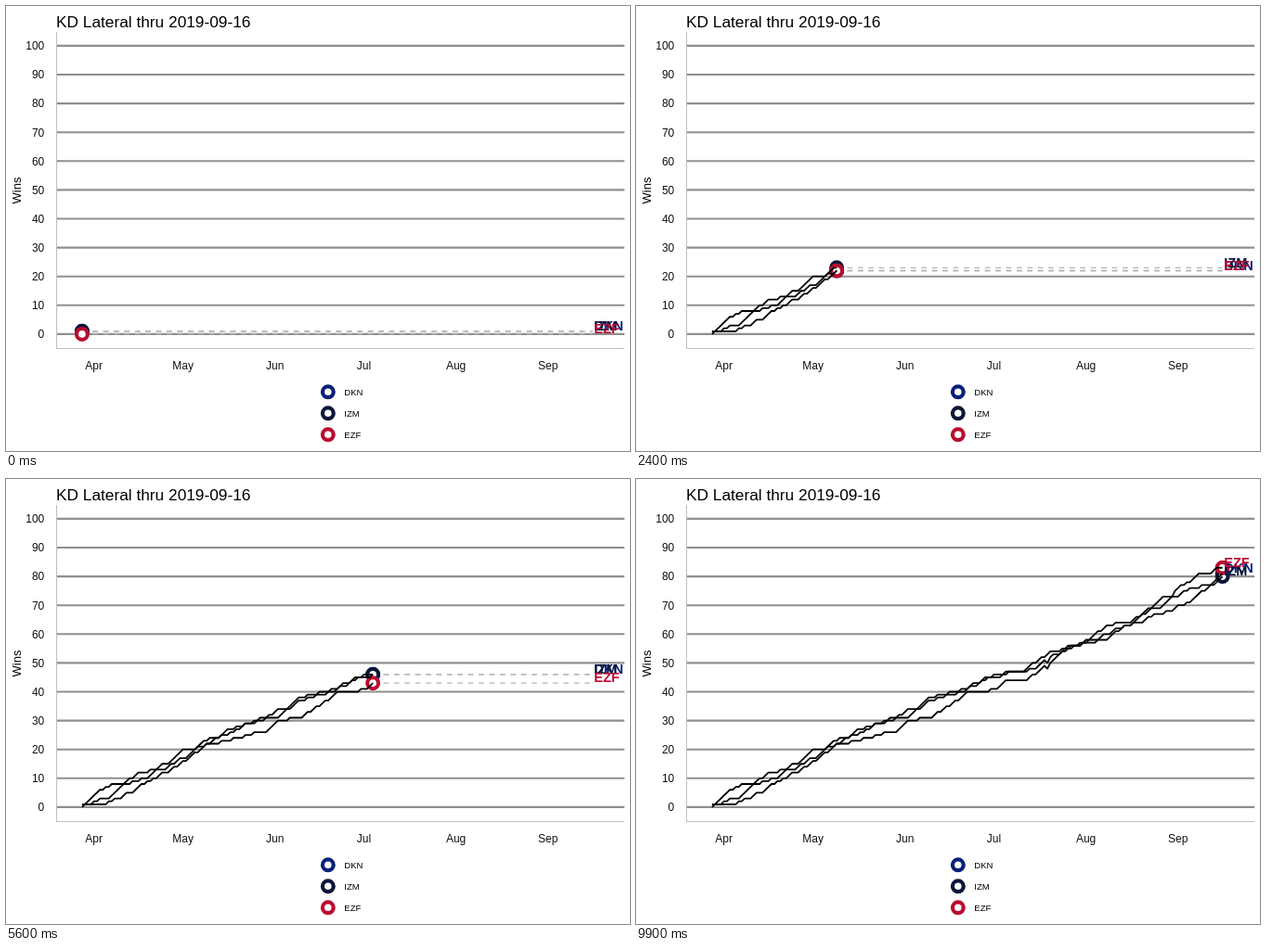
An HTML page for the animation above (10000 ms loop, 672 by 480 pixels).

```html
<!DOCTYPE html>
<html lang="en">
<head>
<meta charset="utf-8">
<title>Wins by day</title>
<style>
  html, body { margin: 0; width: 100%; height: 100%; overflow: hidden; background: #fff; }
  svg { display: block; width: 672px; height: 480px; }
  text { font-family: "Liberation Sans", Arial, sans-serif; font-size: 12px; fill: #111; }
  .title { font-size: 17.3px; fill: #000; }
  .axis-title { font-size: 13px; fill: #000; }
  .legend { font-size: 9.5px; fill: #000; }
  .label { font-size: 14.5px; font-weight: bold; }
  .grid { stroke: #8f8f8f; stroke-width: 2.1; }
  .axis { stroke: #bdbdbd; stroke-width: 1; }
  .lead { stroke: #b4b4b4; stroke-width: 1.4; stroke-dasharray: 5.7 5.7; }
  .ring { fill: #fff; stroke-width: 4.2; }
  .run { fill: none; stroke: #000; stroke-width: 1.8; stroke-linejoin: round; }
</style>
</head>
<body>
<svg id="chart" viewBox="0 0 672 480"></svg>
<script>
  const LAST_DAY = 172, FRAMES = 100, FRAME_MS = 100;

  // One character per day, in groups by month: W one win, D two wins, L one taken back.
  const teams = [
    { name: 'DKN', color: '#081f7a', start: 1, log: [
      '---',
      '-----W-W--WW--WWW-W-W-WW--WW-W',
      'W-WWW-WWW-WW-W--W-W-WW--W---W--',
      '--WWW-WWW--W--W---WW--WW--W-W-',
      '---W-W-----WWW-WW-WW---W---W--W',
      '-WWWW-WW--W-----WW-WWW----WWWW-',
      '-WW-W---W---WWWW'] },
    { name: 'IZM', color: '#0a1638', start: 1, log: [
      '-WW',
      'WWW-W-W----WW-WW---W-----WW-WW',
      '--WWWWWW-W---WWW--W--W---WW--W-',
      'WW---WWWW--W---W-----WW--WWW--',
      'W---W-------W--WWWLDW--W-WW---W',
      '----WWW--WW--W--W---WW-W---W--W',
      'W--W-WWWW-WW-WWW'] },
    { name: 'EZF', color: '#ba0c2f', start: 0, log: [
      'W--',
      'W-W---WWWWW--W--W--WWWWW--WWWW',
      'W----W--W----W---W---W--W----WW',
      'WW---W----WW-WW-WW-WWW-------W',
      '--WWW-------WW-WWWLDWWWWWW---W-',
      'W-------WWW-WW--WWWW-WWWWWW---D',
      'WW-W-WWW----WW--'] }
  ];
  const STEP = { W: 1, D: 2, L: -1, '-': 0 };

  const chart = document.getElementById('chart');
  const dayX = d => 81.9 + d * 3.196;
  const winY = w => 353.9 - w * 3.11;

  function add(tag, attrs, text) {
    const el = document.createElementNS('http://www.w3.org/2000/svg', tag);
    set(el, attrs);
    if (text !== undefined) el.textContent = text;
    return chart.appendChild(el);
  }
  function set(el, attrs) {
    for (const key in attrs) el.setAttribute(key, attrs[key]);
  }
  const line = (cls, x1, y1, x2, y2) => add('line', { class: cls, x1, y1, x2, y2 });
  const ring = (color, cx, cy) => add('circle', { class: 'ring', stroke: color, cx, cy, r: 5.9 });

  for (let w = 0; w <= 100; w += 10) {
    line('grid', 54, winY(w), 666, winY(w));
    add('text', { x: 41.3, y: winY(w) + 4.3, 'text-anchor': 'end' }, w);
  }
  line('axis', 54.5, 28, 54.5, 370);
  line('axis', 54, 369.5, 666, 369.5);

  [['Apr', 4], ['May', 34], ['Jun', 65], ['Jul', 95], ['Aug', 126], ['Sep', 157]].forEach(([month, d]) =>
    add('text', { x: dayX(d), y: 392, 'text-anchor': 'middle' }, month));
  add('text', { class: 'title', x: 54, y: 23 }, 'KD Lateral thru 2019-09-16');
  add('text', { class: 'axis-title', transform: 'translate(15.5 199) rotate(-90)', 'text-anchor': 'middle' }, 'Wins');

  teams.forEach((team, i) => {
    const y = 416.3 + i * 23;
    ring(team.color, 346.8, y);
    add('text', { class: 'legend', x: 364.3, y: y + 3.5 }, team.name);

    team.wins = [team.start];
    for (const day of team.log.join('')) team.wins.push(team.wins[team.wins.length - 1] + STEP[day]);
  });

  // Layers, back to front
  teams.forEach(t => t.lead = line('lead', 0, 0, dayX(LAST_DAY), 0));
  teams.forEach(t => t.ring = ring(t.color, 0, 0));
  teams.forEach(t => t.run = add('polyline', { class: 'run' }));
  teams.forEach(t => t.label = add('text', { class: 'label', x: 633.3, style: 'fill:' + t.color }, t.name));

  function draw(ms) {
    const frame = Math.floor(ms / FRAME_MS) % FRAMES;
    const day = Math.round(frame * LAST_DAY / (FRAMES - 1) + 0.37);
    const x = dayX(day);
    for (const t of teams) {
      const y = winY(t.wins[day]);
      set(t.lead, { x1: x, y1: y, y2: y });
      set(t.ring, { cx: x, cy: y });
      set(t.label, { y: y - 0.8 });
      const points = t.wins.slice(0, day + 1).map((w, d) => dayX(d).toFixed(2) + ',' + winY(w).toFixed(2));
      set(t.run, { points: points.join(' ') });
    }
  }

  const begin = performance.now();
  function tick() {
    draw(performance.now() - begin);
    requestAnimationFrame(tick);
  }
  tick();
</script>
</body>
</html>
```
